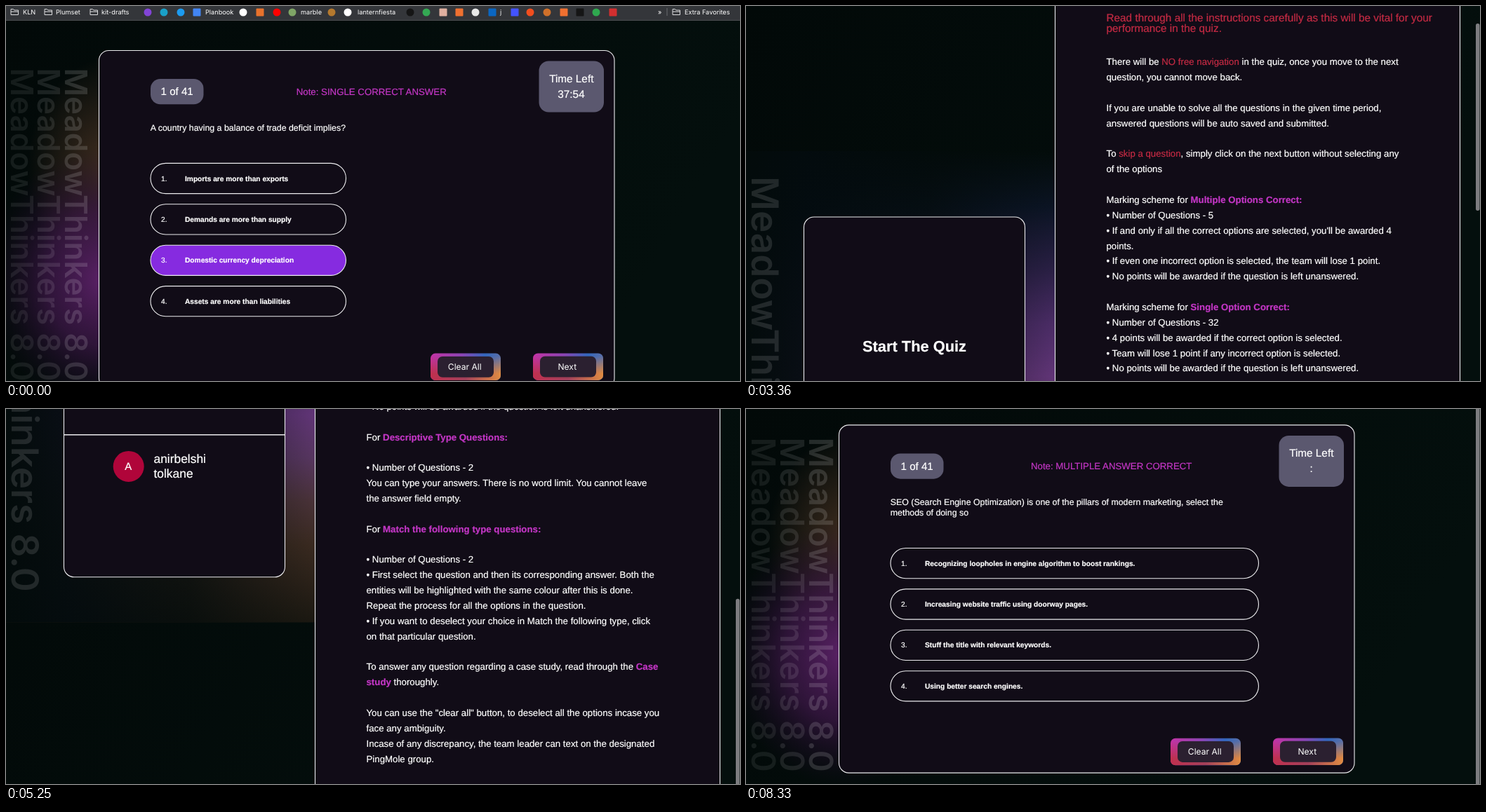
These frames come from a looping animation (1046 by 535 pixels, 8400 ms). An HTML page:

```html
<!DOCTYPE html>
<html lang="en">
<head>
<meta charset="utf-8">
<title>Quiz walkthrough</title>
<style>
  html, body { margin: 0; width: 100%; height: 100%; overflow: hidden; background: #030c0b; }
  svg { display: block; width: 100vw; height: 100vh; }
  text {
    font-family: "Liberation Sans", Arial, sans-serif; white-space: pre; text-rendering: geometricPrecision;
    color: #fff; fill: currentColor; stroke: currentColor; stroke-width: .22px;
  }
  .ui { font-family: Inter, sans-serif; stroke: none; }
  .side { font-family: Inter, sans-serif; font-weight: 600; stroke: none; }
  .bold { font-weight: 700; }
  .mid { text-anchor: middle; }
  .red { color: #c22a43; }
  .pink { color: #c236c4; }
  .card { fill: #110c17; stroke: #ececee; stroke-width: 1.1; }
  .chip { fill: #5b586f; }
</style>
</head>
<body>
<svg viewBox="0 0 1046 535" preserveAspectRatio="none">
  <defs>
    <linearGradient id="backdrop" x2="1" y2=".3">
      <stop stop-color="#020908"/><stop offset="1" stop-color="#040f0d"/>
    </linearGradient>
    <linearGradient id="aurora" x2="0" y2="1">
      <stop stop-color="#0a1220" stop-opacity="0"/><stop offset=".13" stop-color="#0b1424"/>
      <stop offset=".27" stop-color="#291f44"/><stop offset=".4" stop-color="#4b2c66"/>
      <stop offset=".52" stop-color="#613577"/><stop offset=".62" stop-color="#573660"/>
      <stop offset=".72" stop-color="#493238"/><stop offset=".82" stop-color="#3a2a20"/>
      <stop offset="1" stop-color="#1b1811"/>
    </linearGradient>
    <linearGradient id="shade">
      <stop stop-color="#030b0b"/><stop offset=".2" stop-color="#030b0e" stop-opacity=".93"/>
      <stop offset=".6" stop-color="#030b0b" stop-opacity=".7"/>
      <stop offset="1" stop-color="#030b0b" stop-opacity="0"/>
    </linearGradient>
    <radialGradient id="amber">
      <stop stop-color="#4a3323" stop-opacity=".9"/><stop offset="1" stop-color="#4a3323" stop-opacity="0"/>
    </radialGradient>
    <radialGradient id="violet">
      <stop stop-color="#5a2166"/><stop offset=".5" stop-color="#3c1747" stop-opacity=".75"/>
      <stop offset="1" stop-color="#1c0b26" stop-opacity="0"/>
    </radialGradient>
    <linearGradient id="rim">
      <stop stop-color="#c433a4"/><stop offset=".45" stop-color="#8a45b4"/>
      <stop offset=".78" stop-color="#3267bd"/><stop offset="1" stop-color="#5a6fa8"/>
    </linearGradient>
    <linearGradient id="rimLow">
      <stop stop-color="#c0304f"/><stop offset=".5" stop-color="#a2405a"/><stop offset="1" stop-color="#e08c42"/>
    </linearGradient>
    <linearGradient id="fade" x2="0" y2="1">
      <stop offset=".1" stop-color="#000"/><stop offset=".75" stop-color="#fff"/>
    </linearGradient>
    <mask id="lower" maskContentUnits="objectBoundingBox">
      <rect width="1" height="1" fill="url(#fade)"/>
    </mask>
  </defs>
  <rect width="1046" height="535" fill="url(#backdrop)"/>
  <g id="opening"></g>
  <g id="guide"></g>
  <g id="quiz"></g>
  <rect id="thumb" x="1040" width="5.5" rx="2.7" fill="#7d7d80"/>
</svg>
<script>
const LOOP = 8400, STEP = 70;
const byId = id => document.getElementById(id);

const text = (x, y, size, str, cls = '') =>
  `<text x="${x}" y="${y}" font-size="${size}" class="${cls}">${str}</text>`;
const box = (x, y, w, h, r, attrs) =>
  `<rect x="${x}" y="${y}" width="${w}" height="${h}" rx="${r}" ${attrs}/>`;
const sideText = (x, y, size, opacity) =>
  `<text class="side" font-size="${size}" fill-opacity="${opacity}"
    transform="translate(${x} ${y}) rotate(90)">MeadowThinkers 8.0</text>`;
const glow = (cx, cy, rx, ry, id) =>
  `<ellipse cx="${cx}" cy="${cy}" rx="${rx}" ry="${ry}" fill="url(#${id})"/>`;

function button(x, y, w, h, inset, label, size, cls = '') {
  const rise = inset * .43;
  return box(x, y, w, h, 7, 'fill="url(#rim)"')
    + box(x, y, w, h, 7, 'fill="url(#rimLow)" mask="url(#lower)"')
    + box(x + inset, y + rise, w - 2 * inset, h - 2 * rise, 7, 'fill="#2b2030"')
    + text(x + w / 2 - 1.2, y + h / 2 + size * .36, size, label, 'mid ' + cls);
}

function bookmarks() {
  const folder = x => `<path d="M${x - 5} 5.5v7h10.5v-6.5h-5.5l-1.5-1.5h-3.5zM${x - 5} 8h10.5"
    fill="none" stroke="#dcdcde"/>`;
  const labels = [[24, 'KLN'], [71, 'Plumset'], [136, 'kit-drafts'], [284, 'Planbook'],
    [420, 'marble'], [501, 'lanternfiesta'], [704, 'j'], [929, '»'], [967, 'Extra Favorites']];
  const dots = { 202: '#8244d6', 225: '#1aa0c8', 249: '#1d9bf0', 338: '#fff', 386: '#f00',
    408: '#7fa566', 464: '#b5792e', 487: '#fff', 576: '#151515', 599: '#34a853', 669: '#e8e8e8',
    747: '#f24e1e', 771: '#d0702a', 841: '#2fa84f' };
  const squares = { 272: '#4285f4', 362: '#e8722c', 623: '#e0b0a0', 646: '#f07030',
    693: '#0a66c2', 725: '#4353ff', 795: '#f07030', 818: '#151515', 865: '#d32f2f' };
  return box(0, 0, 1046, 21, 0, 'fill="#34363a"') + box(0, 20, 1046, 1, 0, 'fill="#4b4d50"')
    + [12, 60, 125, 955].map(folder).join('')
    + labels.map(([x, s]) => text(x, 12, 9.2, s, 'ui')).join('')
    + Object.entries(dots).map(([x, c]) => `<circle cx="${x}" cy="9" r="5.5" fill="${c}"/>`).join('')
    + Object.entries(squares).map(([x, c]) => box(x - 5.5, 3.5, 11, 11, 1, `fill="${c}"`)).join('')
    + box(941.5, 3, 1, 11, 0, 'fill="#6a6c70"');
}

function question({ side, note, time, prompt, options, width, chosen }) {
  const extra = (prompt.length - 1) * 14.7;
  const rows = options.map((label, i) => {
    const y = 224.4 + extra + i * 58.4;
    const fill = i === chosen ? '#862be0' : 'none';
    return box(206, y, width, 43.2, 21.6, `fill="${fill}" stroke="#ececee" stroke-width="1.1"`)
      + text(221, y + 25.2, 10.2, `${i + 1}.`) + text(255, y + 25.2, 10.2, label, 'bold');
  });
  return glow(145, 235, 115, 160, 'amber') + glow(138, 390, 165, 190, 'violet')
    + side.columns.map((x, i) => sideText(x, side.y, side.size, [.08, .1, .14][i])).join('')
    + box(132.5, 63.5, 734.5, 481.5 + extra, 14, 'class="card"')
    + box(206, 104, 75.5, 36.3, 14, 'class="chip"') + text(243.7, 127.3, 15.1, '1 of 41', 'mid')
    + text(520.7, 126.6, 13.25, note, 'mid pink')
    + box(759.5, 78.5, 92.5, 73, 14, 'class="chip"')
    + text(805.8, 109, 15.3, 'Time Left', 'mid') + text(805.5, 131, 15.3, time, 'mid')
    + prompt.map((s, i) => text(205.8, 177.8 + i * 14.7, 12.36, s)).join('')
    + rows.join('')
    + button(605, 495.6 + extra, 100, 38.5, 10, 'Clear All', 12.1, 'ui')
    + button(751, 495.4 + extra, 100, 38.5, 10, 'Next', 12.1, 'ui');
}

// Blank lines keep the rhythm; *...* is a pink term, ~...~ a red one.
const RULES = `There will be ~NO free navigation~ in the quiz, once you move to the next
question, you cannot move back.

If you are unable to solve all the questions in the given time period,
answered questions will be auto saved and submitted.

To ~skip a question~, simply click on the next button without selecting any
of the options

Marking scheme for *Multiple Options Correct:*
• Number of Questions - 5
• If and only if all the correct options are selected, you'll be awarded 4
points.
• If even one incorrect option is selected, the team will lose 1 point.
• No points will be awarded if the question is left unanswered.

Marking scheme for *Single Option Correct:*
• Number of Questions - 32
• 4 points will be awarded if the correct option is selected.
• Team will lose 1 point if any incorrect option is selected.
• No points will be awarded if the question is left unanswered.

For *Descriptive Type Questions:*

• Number of Questions - 2
You can type your answers. There is no word limit. You cannot leave
the answer field empty.

For *Match the following type questions:*

• Number of Questions - 2
• First select the question and then its corresponding answer. Both the
entities will be highlighted with the same colour after this is done.
Repeat the process for all the options in the question.
• If you want to deselect your choice in Match the following type, click
on that particular question.

To answer any question regarding a case study, read through the *Case*
*study* thoroughly.

You can use the "clear all" button, to deselect all the options incase you
face any ambiguity.
Incase of any discrepancy, the team leader can text on the designated
PingMole group.`;

function guide() {
  const markup = s => s.replace(/\*(.+?)\*/g, '<tspan class="pink bold">$1</tspan>')
    .replace(/~(.+?)~/g, '<tspan class="red">$1</tspan>');
  const rules = RULES.split('\n').map((s, i) => text(513.5, 157.2 + i * 21.86, 13.25, markup(s)));
  return box(0, 280, 440, 618, 0, 'fill="url(#aurora)"') + box(0, 280, 440, 618, 0, 'fill="url(#shade)"')
    + sideText(8, 316, 53, .12)
    + box(82.5, 374, 315, 459.3, 14.5, 'class="card"')
    + text(240, 566, 21.85, 'Start The Quiz', 'mid bold')
    + box(83, 629.6, 314, 1.5, 0, 'fill="#ececee"')
    + '<circle cx="174.7" cy="675.5" r="22" fill="#b0053a"/>'
    + text(174.3, 680.4, 15, 'A', 'mid')
    + text(210.5, 671, 17.4, 'anirbelshi') + text(210.5, 691.3, 17.4, 'tolkane')
    + box(440.5, 15.3, 577, 1300, 14, 'class="card"')
    + text(513.5, 57.5, 15.3, 'Qualifying Quiz Round Instructions') + box(513.5, 59.3, 235.5, 1.2, 0, 'fill="#fff"')
    + text(513.5, 95, 15.33, 'Read through all the instructions carefully as this will be vital for your', 'red')
    + text(513.5, 110.4, 15.33, 'performance in the quiz.', 'red')
    + rules.join('')
    + button(857, 1133.5, 105.5, 41.5, 13, 'Start Quiz', 10.2);
}

byId('opening').innerHTML = question({
  side: { columns: [6.5, 45, 83.5], y: 88.5, size: 44 },
  note: 'Note: SINGLE CORRECT ANSWER', time: '37:54',
  prompt: ['A country having a balance of trade deficit implies?'],
  options: ['Imports are more than exports', 'Demands are more than supply',
    'Domestic currency depreciation', 'Assets are more than liabilities'],
  width: 278.5, chosen: 2
}) + bookmarks();
byId('guide').innerHTML = guide();
byId('quiz').innerHTML = question({
  side: { columns: [8, 49, 90], y: 81, size: 47 },
  note: 'Note: MULTIPLE ANSWER CORRECT', time: ':',
  prompt: ['SEO (Search Engine Optimization) is one of the pillars of modern marketing, select the',
    'methods of doing so'],
  options: ['Recognizing loopholes in engine algorithm to boost rankings.',
    'Increasing website traffic using doorway pages.',
    'Stuff the title with relevant keywords.', 'Using better search engines.'],
  width: 524.5
});

// [time, scroll position, ease-out power of the stretch leading here]
const SCROLL = [[2170, -6], [2240, 0], [2380, 14], [2660, 14], [2940, 44], [3150, 44], [3360, 73],
  [3640, 73], [4200, 232], [4830, 442], [5530, 634, 1.7]];

function scrollAt(t) {
  const next = SCROLL.findIndex(key => key[0] >= t);
  if (next < 0) return SCROLL[SCROLL.length - 1][1];
  if (next === 0) return SCROLL[0][1];
  const [t0, y0] = SCROLL[next - 1], [t1, y1, power = 1] = SCROLL[next];
  return y0 + (y1 - y0) * (1 - (1 - (t - t0) / (t1 - t0)) ** power);
}

function show(id, visible, y) {
  byId(id).setAttribute('display', visible ? 'inline' : 'none');
  byId(id).setAttribute('transform', `translate(0 ${y})`);
}

function draw(now) {
  const t = Math.floor(now % LOOP / STEP) * STEP;
  const scroll = scrollAt(t), inQuiz = t >= 7000;
  show('opening', t < 70, 0);
  show('guide', t >= 70 && !inQuiz, -scroll);
  show('quiz', inQuiz, -40.6 + Math.max(0, Math.min(4, (8330 - t) / 35)));

  const thumb = byId('thumb');
  thumb.setAttribute('y', inQuiz ? -4 : -9.4 + scroll * .472);
  thumb.setAttribute('height', inQuiz ? 543 : 267);
  const fade = Math.max(0, Math.min(1, (6300 - t) / 350));
  thumb.setAttribute('opacity', inQuiz ? +(t >= 8260) : t < 2240 ? 0 : fade);
  requestAnimationFrame(draw);
}
draw(performance.now());
</script>
</body>
</html>
```
